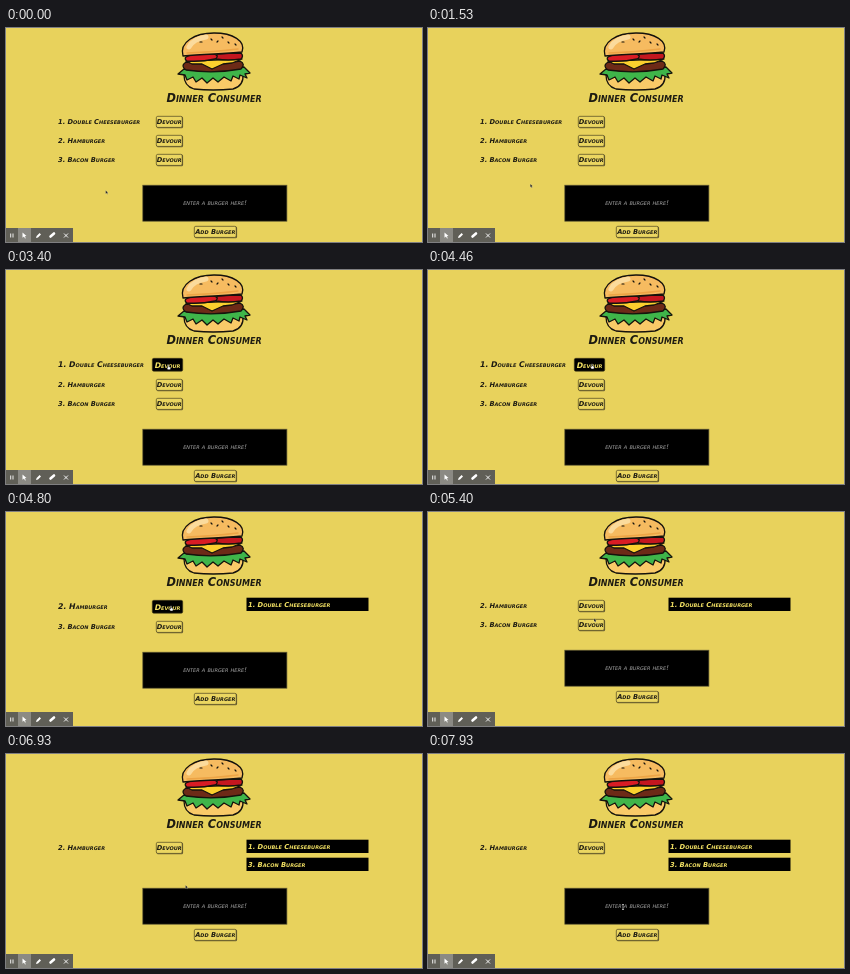
Animation, 416 px wide and 214 px high, one loop 8000 ms. Source, as an HTML page:

```html
<!DOCTYPE html>
<html lang="en">
<head>
<meta charset="utf-8">
<title>Dinner Consumer</title>
<style>
  html, body { margin: 0; width: 100%; height: 100%; overflow: hidden; background: #e8d25c; }
  svg { display: block; width: 100%; height: 100%; }
  text { font: italic 700 8px "DejaVu Sans", Verdana, sans-serif; font-variant: small-caps; fill: #1d1b12; }
  .mid { text-anchor: middle; }
  .lit { fill: #f4e264; }
  .hint { fill: #aaa; font-weight: 400; }
  .burger { stroke: #15120c; stroke-width: 1.3; stroke-linejoin: round; stroke-linecap: round; }
</style>
</head>
<body>
<svg viewBox="0 0 416 214">
  <rect width="416" height="214" fill="#e8d25c"/>
  <g class="burger">
    <path d="M178 47Q207 53 237 46Q238 58 227 61Q207 63 188 61Q178 58 178 47Z" fill="#f9ca68"/>
    <path d="M172 46L178 41Q208 46 238 39L244 45L239 46L241 50L234 47L233 51L227 48L225 53L218 49L212 54L207 50L201 55L196 50L190 54L187 49L181 52L179 47Z" fill="#3fb54a"/>
    <path d="M180 34Q208 38 234 33Q240 36 235 41Q208 46 180 42Q174 38 180 34Z" fill="#6d2a17"/>
    <path d="M180 33L236 31L226 35L217 36L206 41L196 36L186 36Z" fill="#fbd02e"/>
    <path d="M211 26Q224 25 235 25Q238 28 235 31Q222 33 210 31Z" fill="#c4161f"/>
    <path d="M180 29Q186 25 208 26Q214 28 209 31Q195 34 181 33Q178 31 180 29Z" fill="#d91c24"/>
    <path d="M177 28C173 14 189 5 208 5C227 5 240 13 236 24Q226 25 208 26Q187 27 177 28Z" fill="#f6bb60"/>
    <path d="M183 19Q187 11 200 9" fill="none" stroke="#fbdb9c" stroke-width="5"/>
    <path d="M181 25Q208 24 232 21" fill="none" stroke="#eda445" stroke-width="1.5"/>
    <path d="M194 14l2 0M205 11l1 1M211 14l1 -1M216 9l1 1M222 14l1 1M229 16l1 1" stroke-width="1.2"/>
  </g>
  <text class="mid" x="208" y="73.5" style="font-size:11.4px">Dinner Consumer</text>
  <g id="page"></g>
  <g>
    <path d="M0 200H67V214H0Z" fill="#605f57"/>
    <path d="M12 200H25V214H12Z" fill="#8b8a84"/>
    <path d="M4.7 205.5v4M7 205.5v4M58 205.5l4 4M62 205.5l-4 4" stroke="#fff" stroke-width=".9"/>
    <path d="M16.500 204.500l4 3.500l-1.700 .2l1 2l-.8 .4l-1 -2l-1.500 1.200Z" fill="#fff"/>
    <path d="M30 210l.6 -2l3 -3l1.400 1.400l-3 3Z" fill="#fff"/>
    <path d="M44.500 208.500L48 205.500" stroke="#fff" stroke-width="2.600" stroke-linecap="round"/>
  </g>
  <g id="cursor"></g>
</svg>
<script>
const LOOP = 8000;
const page = document.getElementById('page');
const cursor = document.getElementById('cursor');

// Pointer path: time, x, y
const path = [
  [0, 99.7, 162.5], [400, 101, 160], [1330, 102, 157], [1530, 102.3, 156], [1800, 116, 151],
  [2250, 157, 132], [2600, 154, 112], [2950, 162, 95], [4460, 164, 94], [4800, 165, 94],
  [5050, 166, 97], [5400, 166, 106.5], [5600, 167, 113], [6550, 167, 113],
  [7200, 187, 142], [7600, 195, 153], [LOOP, 195, 153]
];
const foods = [
  { name: '1. Double Cheeseburger', eaten: 4800 },
  { name: '2. Hamburger', eaten: Infinity },
  { name: '3. Bacon Burger', eaten: 6550 }
];
const icons = {
  arrow: '<path d="M0 0V3.2L.8 2.500L1.400 3.800L2 3.500L1.400 2.300L2.400 2.300Z" fill="#111" stroke="#eee" stroke-width=".2"/>',
  hand: '<path d="M-.6 0Q0 -.6 .6 0V2L2.200 2.400V4L1.600 5H-.7L-1.700 3L-.6 2.800Z" fill="#fff" stroke="#111" stroke-width=".5"/>',
  beam: '<path d="M-1 -2.500H1M0 -2.500V2.500M-1 2.500H1" stroke="#ddd" stroke-width=".7"/>'
};

function pointer(t) {
  const i = path.findIndex(p => p[0] > t);
  const [a, b] = [path[i - 1], path[i]];
  const k = (t - a[0]) / (b[0] - a[0]);
  const e = k * k * (3 - 2 * k);
  return [a[1] + (b[1] - a[1]) * e, a[2] + (b[2] - a[2]) * e];
}

const rect = (x, y, w, h, attrs) => `<rect x="${x}" y="${y}" width="${w}" height="${h}" ${attrs}/>`;
const text = (x, y, size, label, cls = '') =>
  `<text x="${x}" y="${y}" class="${cls}" style="font-size:${size}px">${label}</text>`;

function button(x, y, w, h, size, label, hot) {
  const fill = hot ? '#000' : '#ebd661';
  return (hot ? '' : rect(x + .6, y + .6, w, h, 'rx="1.5" fill="#6b6136"')) +
    rect(x + .3, y + .3, w - .6, h - .6, `rx="1.5" fill="${fill}" stroke="#3d3719" stroke-width=".6"`) +
    text(x + w / 2, y + h / 2 + size * .37, size, label, hot ? 'mid lit' : 'mid');
}

let last = '';
function draw(now) {
  const t = now % LOOP;
  const [x, y] = pointer(t);
  const left = foods.filter(f => t < f.eaten);
  const done = foods.filter(f => t >= f.eaten);
  const over = x >= 150 && x <= 177
    ? left.findIndex((f, i) => y >= 88 + 19 * i && y <= 100 + 19 * i) : -1;
  const top = Math.max(100 + 19 * left.length + (over < 0 ? 0 : 2), 98 + 18 * done.length);

  let html = '';
  left.forEach((f, i) => {
    const hot = i === over;
    const rowY = 88 + 19 * i + (over >= 0 && i > over ? 2 : 0);
    html += text(52, rowY + (hot ? 9 : 7.8), hot ? 7.8 : 6.7, f.name);
    html += hot ? button(146, rowY, 31, 13.5, 7.7, 'Devour', true)
                : button(150, rowY, 26.5, 11.7, 6.7, 'Devour');
  });
  done.forEach((f, i) => {
    html += rect(240.5, 85.7 + 18 * i, 122, 13.3, 'fill="#000"');
    html += text(242, 95 + 18 * i, 6.75, f.name, 'lit');
  });
  html += rect(136.8, top + .2, 144.1, 36, 'fill="#000" stroke="#5f5934" stroke-width=".7"');
  html += text(209, top + 20, 6.7, 'enter a burger here!', 'mid hint');
  html += button(188, top + 41, 42.5, 11.7, 6.7, 'Add Burger');
  if (html !== last) page.innerHTML = last = html;

  const typing = x > 137 && x < 281 && y > top && y < top + 36;
  cursor.innerHTML = icons[over >= 0 ? 'hand' : typing ? 'beam' : 'arrow'];
  cursor.setAttribute('transform', `translate(${x} ${y})`);
  requestAnimationFrame(draw);
}
requestAnimationFrame(draw);
</script>
</body>
</html>
```
